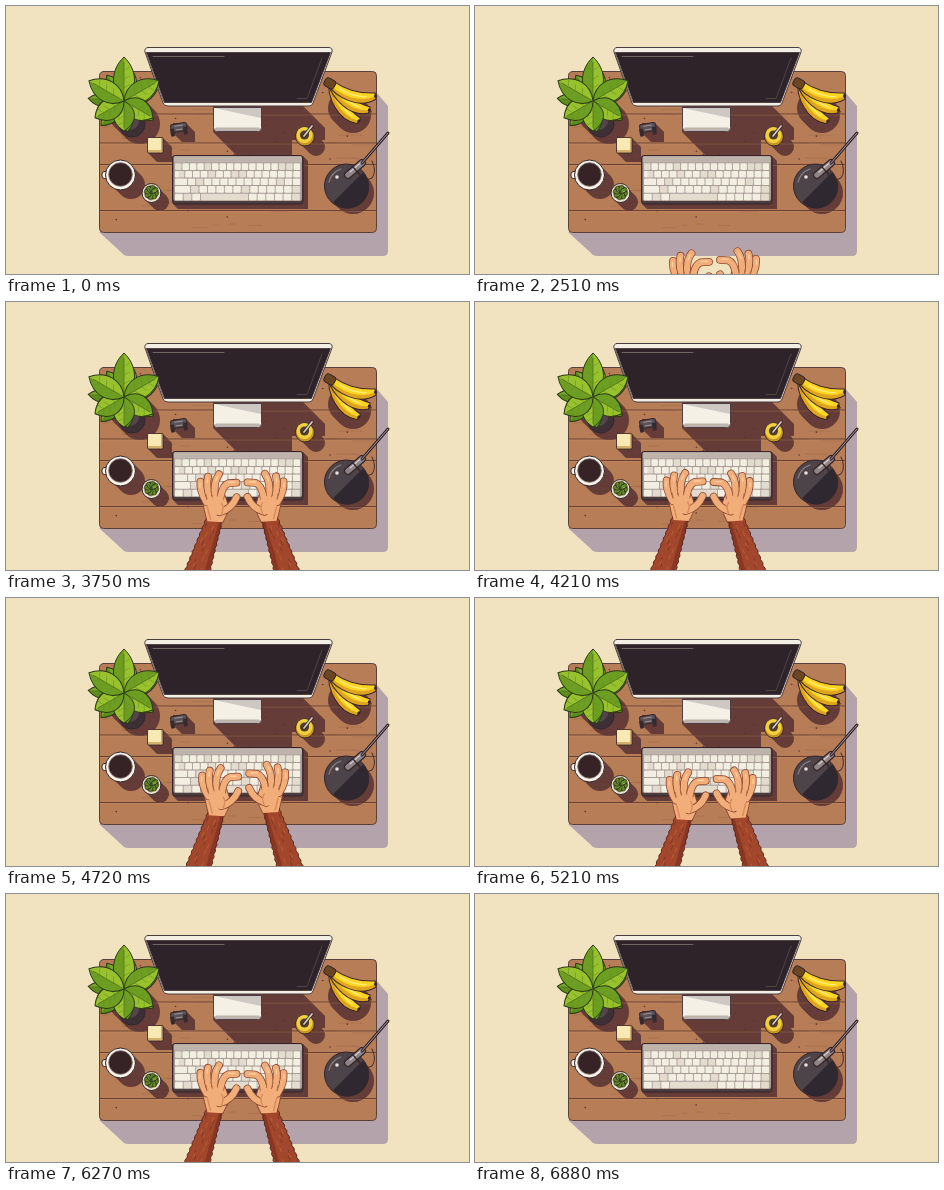
Recreate the animation shown at these times as an HTML page with a canvas. Size 463 by 268 pixels, loop 8.18 s.

```html
<!DOCTYPE html>
<html lang="en">
<head>
<meta charset="utf-8">
<title>Desk</title>
<style>
html, body { margin: 0; width: 100%; height: 100%; overflow: hidden; background: #f1e2c0; }
canvas { display: block; width: 463px; height: 268px; }
</style>
</head>
<body>
<canvas id="stage"></canvas>
<script>
const W = 463, H = 268, LOOP = 8180;
const ENTER = 2510, TYPE = 2970, REST = 6580, LEAVE = 6880, STROKE = 828;
const INK = '#35252a', SHADE = '#653c37', SKIN = '#f2ae7a', SKIN_INK = '#8a4930';
const dpr = window.devicePixelRatio || 1;

const stage = setup(document.getElementById('stage'));
const room = setup(document.createElement('canvas'));
let c = room;

function setup(canvas) {
  canvas.width = W * dpr;
  canvas.height = H * dpr;
  const ctx = canvas.getContext('2d');
  ctx.scale(dpr, dpr);
  ctx.lineJoin = ctx.lineCap = 'round';
  return ctx;
}

function path(d, fill, line, width = 1) {
  const p = new Path2D(d);
  if (fill) { c.fillStyle = fill; c.fill(p); }
  if (line) { c.strokeStyle = line; c.lineWidth = width; c.stroke(p); }
}
function box(x, y, w, h, r, fill, line, width) {
  const p = new Path2D();
  p.roundRect(x, y, w, h, r);
  path(p, fill, line, width);
}
function disc(x, y, r, fill, line, width) {
  const p = new Path2D();
  p.arc(x, y, r, 0, Math.PI * 2);
  path(p, fill, line, width);
}
function at(x, y, angle, draw) {
  c.save();
  c.translate(x, y);
  c.rotate(angle);
  draw();
  c.restore();
}
function seeded(seed) {
  return () => (seed = seed * 16807 % 2147483647) / 2147483647;
}

// Shadows fall diagonally, down and to the right.
function castBox(x, y, w, h, d) {
  path(`M${x} ${y}h${w}l${d} ${d}v${h}h${-w}l${-d} ${-d}Z`, SHADE);
}
function castDisc(x, y, r, d) {
  path(`M${x} ${y}l${d} ${d}`, null, SHADE, r * 2);
}

function drawDesk() {
  const rnd = seeded(71);
  path('M93 226L116 247Q118 250 122 250H377Q382 250 382 245V100L370 86V226Z', '#b5a3ac');
  const top = new Path2D();
  top.roundRect(93.5, 65.5, 277, 161, 4);
  path(top, '#b77d57');
  c.save();
  c.clip(top);
  castBox(207, 101, 49, 25, 30);
  castBox(207, 90, 80, 12, 32);
  castBox(167, 150, 130, 48, 5);
  castBox(142, 132, 15, 15, 9);
  castBox(167, 117, 13, 10, 9);
  castDisc(115, 169, 14, 10);
  castDisc(145, 187, 9, 9);
  castDisc(299, 130, 9, 11);
  castDisc(340, 180, 21, 7);
  castDisc(122, 106, 20, 12);
  castDisc(340, 102, 18, 7);
  for (let i = 0; i < 40; i++) {
    path(`M${96 + rnd() * 250} ${68 + rnd() * 156}h${5 + rnd() * 22}`, null, 'rgba(90,45,30,.22)', .6);
  }
  for (let i = 0; i < 36; i++) disc(98 + rnd() * 268, 69 + rnd() * 154, .8, '#573430');
  for (const y of [108, 137, 158.5, 204.5]) {
    path(`M94 ${y}H370`, null, '#5f3a32', .9);
    path(`M94 ${y + 1}H370`, null, 'rgba(225,165,120,.3)', .7);
  }
  c.restore();
  path(top, null, '#59403a', 1);
}

function drawMonitor() {
  path('M142 41.500H323Q327 42 326 46L307 97Q306 100 303 100H162Q158 100 157 97L139 46Q138 42 142 41.500Z', '#f4efe4', '#4b3e42', 1);
  path('M140.500 46.500H324.500L305.500 96.500H158.500Z', '#2d2329', INK, .7);
  path('M147 50.500H218', null, '#8d817d', .7);
  path('M291 92.500H301L316 52', null, '#5e5254', .7);
  box(207.5, 101.5, 48, 24, [0, 0, 4, 4], '#f4f0e6', '#4b3e42', 1);
  path('M208 102H255V112Z', '#cfc8c2');
  box(209, 121.5, 45, 3.5, 2, '#bdb4ae');
}

function drawKeyboard() {
  const rnd = seeded(19);
  const key = (x, y, w) => box(x, y, w - .9, 6.6, .8, rnd() < .15 ? '#e3dbce' : '#f3eee2');
  box(166.5, 149.5, 130.5, 48.5, 2.5, '#4b3c3e', INK, 1);
  box(167.5, 150, 128.5, 45, 2, '#a99f99');
  box(168, 150.5, 127.5, 6, 1, '#beb4ab');
  for (let row = 0; row < 4; row++) {
    const n = 17 - row, lead = row * 2.5, w = (126 - lead) / n;
    for (let i = 0; i < n; i++) key(169 + lead + i * w, 157.3 + row * 7.6, w);
    if (lead) key(169, 157.3 + row * 7.6, lead + 2);
  }
  for (let i = 0, x = 169; i < 10; i++) {
    const w = i === 3 ? 48 : 8.65;
    key(x, 187.7, w);
    x += w;
  }
}

// Pointed leaf with one darker half, a midrib and side veins.
function leaf(x, y, angle, len, w, light = '#98c22d') {
  at(x, y, angle, () => {
    const edge = `M0 0C${len * .25} ${-w} ${len * .7} ${-w} ${len} 0`;
    path(`${edge}C${len * .7} ${w} ${len * .25} ${w} 0 0Z`, light, '#2a3518', 1);
    path(`${edge}Z`, 'rgba(40,100,15,.38)');
    path(`M0 0H${len * .88}`, null, '#4a6b1c', .7);
    for (let k = .3; k < .8; k += .2) {
      path(`M${len * k + 3} ${-w * .4}L${len * k} 0l3 ${w * .4}`, null, '#658b22', .5);
    }
  });
}

function drawPlants() {
  disc(126, 118, 13, '#3c3036', INK);
  disc(124, 115, 9, '#55464b');
  const under = 7, over = 6;
  for (let i = 0; i < under; i++) {
    const a = .55 + i * Math.PI * 2 / under;
    leaf(118, 96, a, 33 + 3 * Math.cos(2 * a), 10, '#79a826');
  }
  for (let i = 0; i < over; i++) {
    const a = -Math.PI / 2 + i * Math.PI * 2 / over;
    leaf(118, 95, a, 37 - 7 * Math.sin(a), 14);
  }
  disc(145.5, 187, 9.5, '#efe7d9', INK);
  disc(145.5, 186.5, 7.3, '#4c4230');
  for (let a = .2; a < 6.4; a += Math.PI / 4) leaf(145.5, 186.5, a, 7, 3, '#a9c36a');
}

function drawSmallThings() {
  // Coffee
  box(96, 165.5, 10, 7, 2.5, '#f7f3e9', INK);
  disc(114.5, 169, 15, '#f7f3e9', INK);
  disc(114.5, 168.5, 11.8, '#352326', '#7f706b', .8);
  // Note block
  box(141.5, 131.5, 15.5, 15.5, 1, '#d2b06d', INK, .8);
  box(142, 132, 13, 12, 1, '#f8e8b4');
  // Clip
  at(173, 122.5, -.16, () => {
    box(-8, -5, 16, 8, 2, '#5b5257', INK);
    for (const x of [-9, 4]) box(x, -1, 4, 8, 1, '#352c31');
    path('M-4 -3H4M-3 1H3', null, '#a0959a');
  });
  // Pen cup
  disc(299, 130.5, 9.5, '#c89723', INK);
  disc(298.5, 129, 8, '#f3d13c');
  disc(298.5, 129, 4.6, '#54402a');
  const pen = 'M298 130L306 120';
  path(pen, null, INK, 3.4);
  path(pen, null, '#d8cfc5', 1.7);
}

function drawBananas() {
  for (let i = 2; i >= 0; i--) {
    at(326, 79, .25 + i * .34, () => {
      path('M0 -4Q22 4 44 -3L46 3Q36 13 20 11Q4 9 -3 1Z', '#e0a51c', INK, 1);
      path('M1 -3Q22 5 43 -2L44 1Q32 9 18 7Q5 5 -1 0Z', '#fbd524');
      path('M9 2Q23 6 36 3', null, '#fff08a', 1.1);
      disc(45, 0, 1.6, INK);
    });
  }
  at(324, 78, .5, () => box(-6, -5, 11, 9, 3, '#6a4623', INK));
}

function drawLamp() {
  disc(340.5, 180, 22, '#4d444a', INK);
  at(340.5, 180, -Math.PI / 4, () => path('M-21 2H21A21 21 0 0 1 -21 2Z', '#302830'));
  path('M323 176A19 19 0 0 1 335 163', null, '#8d8286', 1.2);
  disc(331, 171, 1.8, '#e9e3dc');
  path('M352 165Q356 178 366 172Q371 165 366 155', null, INK, .9);
  const arm = 'M342 169L356 157', rod = 'M356 157L382 127';
  path(arm, null, INK, 8);
  path(arm, null, '#8e8487', 5.5);
  path('M344 166L355 156.500', null, '#d6cec9', 1.2);
  path('M347 161L353 168', null, INK, 1.2);
  path(rod, null, INK, 3);
  path(rod, null, '#a39999', 1);
}

// Sleeve of fur, widening until it runs past the lower edge.
function furArm() {
  const rnd = seeded(5);
  let left = '', right = '';
  for (let d = 0; d <= 70; d += 3) {
    const tuft = d % 2 ? .7 : -.4;
    left = `L${204 - d * .41 - tuft} ${214 + d}` + left;
    right += `L${220 - d * .24 + tuft} ${214 + d}`;
  }
  path(`M204 214L208 213L211 216L214 213L217 216${right}${left}Z`, '#a2472b', '#5e2a20', 1);
  path('M218 219L200 282', null, 'rgba(90,28,20,.35)', 4);
  for (let d = 5; d < 60; d += 3) {
    path(`M${206 - d * .38 + rnd() * (11 + d * .16)} ${214 + d}l-1.500 4`, null, d % 2 ? '#7f3623' : '#bd6039', .9);
  }
}

const PALM = 'M200 194Q210 184 222 191L226 203Q224 211 220 218L205 217Q202 206 200 194Z';
const FINGERS = [
  'M204 198Q197 187 198 177.500',
  'M208 195Q203 182 205.500 172.500',
  'M213 193Q210 179 216.500 170',
  'M218 193Q220 181 226 179L234 178.500',
  'M217 208Q229 205 234 193'
];

function hand(dx, dy, mirrored) {
  c.save();
  c.translate(dx, dy);
  if (mirrored) {
    c.translate(479, -4);
    c.scale(-1, 1);
  }
  path(PALM, null, SKIN_INK, 1.8);
  furArm();
  path(PALM, SKIN);
  for (const finger of FINGERS) {
    path(finger, null, SKIN_INK, 7.8);
    path(finger, null, SKIN, 6.2);
  }
  path('M204 195Q213 188 221 194L221 210L206 211Z', SKIN);
  path('M205 203Q207 211 208 215M219 199Q222 203 219 210', null, '#d98a58', 1.4);
  path('M203.500 190L204.500 195M208.500 187L210 193M215 188V192', null, '#b26a45', .9);
  path('M197.500 179V183M205 174V178M215 172L213 177M226 178H232', null, '#ffd2a3', 1.2);
  c.restore();
}

const clamp = v => Math.max(0, Math.min(1, v));
const ease = v => (v = clamp(v)) * v * (3 - 2 * v);
const mix = (a, b, k) => a + (b - a) * k;

// Strokes alternate: sway right with the right hand lifting, then left with the left.
function poseAt(t) {
  const u = Math.max(0, t - TYPE) / STROKE, p = u % 1;
  const toRight = Math.floor(u) % 2 === 0;
  const wave = Math.sin(2 * Math.PI * p), lift = Math.max(0, wave), press = Math.max(0, -wave);
  const sway = Math.sin(Math.PI * Math.min(1, p / .72)) * (toRight ? 3.5 : -3.5);
  const typing = ease((t - TYPE) / 300) - ease((t - REST) / 100);
  const slide = 69 * (1 - clamp((t - ENTER) / 200)) ** 2 + 95 * clamp((t - 6680) / 200) ** 2;
  return {
    x: mix(0, sway - 3.5, typing),
    left: slide + mix(9, 1 + 3.5 * press - (toRight ? 1.3 : 5) * lift, typing),
    right: slide + mix(11, 5.5 + press - (toRight ? 7 : 0) * lift, typing)
  };
}

function frame(t) {
  c.drawImage(room.canvas, 0, 0, W, H);
  if (t < ENTER || t >= LEAVE) return;
  const pose = poseAt(t);
  hand(pose.x, pose.left, false);
  hand(pose.x, pose.right, true);
}

c.fillStyle = '#f1e2c0';
c.fillRect(0, 0, W, H);
drawDesk();
drawMonitor();
drawKeyboard();
drawPlants();
drawSmallThings();
drawBananas();
drawLamp();

c = stage;
const start = performance.now();
function tick() {
  frame((performance.now() - start) % LOOP);
  requestAnimationFrame(tick);
}
tick();
</script>
</body>
</html>
```
